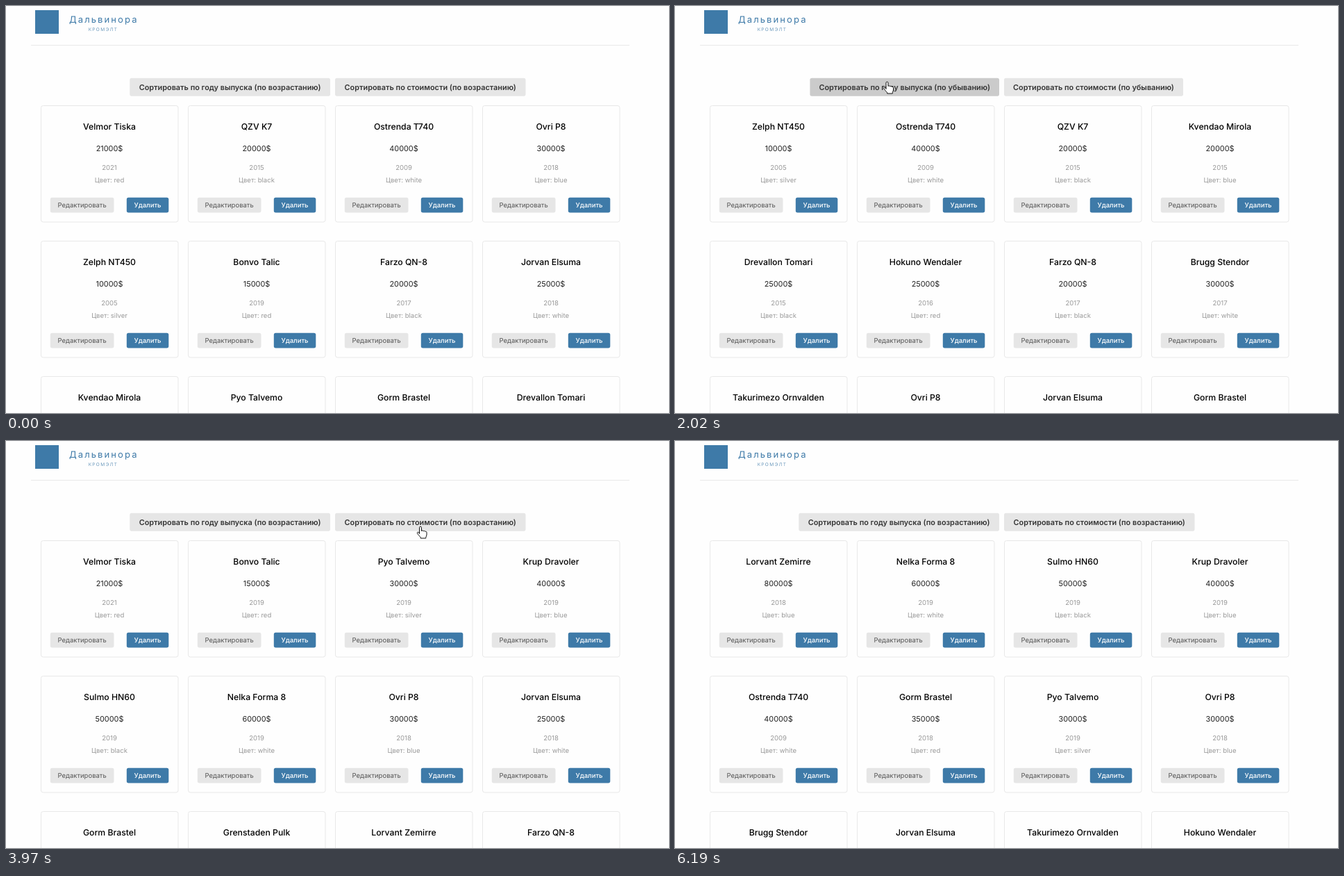
Recreate the animation shown at these times as an HTML page. Size 955 by 586 pixels, loop 6610 ms.

```html
<!DOCTYPE html>
<html lang="ru">
<head>
<meta charset="utf-8">
<title>Каталог машин</title>
<style>
  html, body { margin: 0; width: 100%; height: 100%; overflow: hidden; background: #fefefe; }
  svg { display: block; width: 955px; height: 586px; font-family: Inter, sans-serif; text-rendering: geometricPrecision; }
  .name { font-size: 12.24px; font-weight: 500; fill: #000; }
  .price { font-size: 10.88px; fill: #222; }
  .note { font-size: 9.52px; fill: #999; }
  .edit { font-size: 9.52px; fill: #555; }
  .del { font-size: 9.52px; font-weight: 500; fill: #fff; }
  .sort { font-size: 10.88px; font-weight: 600; fill: #333; }
  .brand { font-size: 13px; font-weight: 400; letter-spacing: 2.1px; fill: #3e7aa8; }
  .sub { font-size: 6.5px; font-weight: 300; letter-spacing: 1.4px; fill: #3e7aa8; }
</style>
</head>
<body>
<svg id="stage" viewBox="0 0 955 586"></svg>
<script>
const LOOP = 6610, STEP = 70;
const BLUE = '#3e7aa8', GREY = '#e6e6e6', HOVER = '#cbcbcb';

const cars = [
  ['Velmor Tiska', 21000, 2021, 'red'],
  ['QZV K7', 20000, 2015, 'black'],
  ['Ostrenda T740', 40000, 2009, 'white'],
  ['Ovri P8', 30000, 2018, 'blue'],
  ['Zelph NT450', 10000, 2005, 'silver'],
  ['Bonvo Talic', 15000, 2019, 'red'],
  ['Farzo QN-8', 20000, 2017, 'black'],
  ['Jorvan Elsuma', 25000, 2018, 'white'],
  ['Kvendao Mirola', 20000, 2015, 'blue'],
  ['Pyo Talvemo', 30000, 2019, 'silver'],
  ['Gorm Brastel', 35000, 2018, 'red'],
  ['Drevallon Tomari', 25000, 2015, 'black'],
  ['Krup Dravoler', 40000, 2019, 'blue'],
  ['Grenstaden Pulk', 20000, 2018, 'silver'],
  ['Hokuno Wendaler', 25000, 2016, 'red'],
  ['Sulmo HN60', 50000, 2019, 'black'],
  ['Brugg Stendor', 30000, 2017, 'white'],
  ['Takurimezo Ornvalden', 25000, 2017, 'black'],
  ['Lorvant Zemirre', 80000, 2018, 'blue'],
  ['Nelka Forma 8', 60000, 2019, 'white']
].map(([name, price, year, color]) => ({ name, price, year, color }));

// Each sort works on the previous order, so ties keep their sequence.
const by = (list, key, sign) => [...list].sort((a, b) => sign * (a[key] - b[key]));
const views = [{ from: 0, list: cars, rising: true }];
for (const [from, key, sign] of [[2020, 'year', 1], [3360, 'year', -1], [4380, 'price', 1], [5780, 'price', -1]]) {
  views.push({ from, list: by(views[views.length - 1].list, key, sign), rising: sign < 0 });
}
const clicks = [[1890, 2020], [3290, 3360], [4320, 4380], [5710, 5780]];

// Pointer tracks: time, x, y
const tracks = [
  [[430, 894, 560], [570, 820, 470], [780, 560, 270], [920, 420, 180], [1060, 347, 127],
   [1200, 322, 113], [1550, 309.5, 107.5], [1690, 305.5, 109.5]],
  [[3620, 312, 111], [3690, 352, 118], [3760, 420, 128], [3830, 510, 135], [3900, 605, 137],
   [3970, 597, 123.5], [4040, 592, 120], [4250, 589, 116.5]],
  [[5780, 589, 116.5], [5850, 596, 124], [5920, 650, 200], [5990, 725, 320], [6060, 795, 450], [6120, 838, 550]]
];

const stage = document.getElementById('stage');
function add(tag, attrs, text = '') {
  const el = document.createElementNS('http://www.w3.org/2000/svg', tag);
  for (const k in attrs) el.setAttribute(k, attrs[k]);
  el.textContent = text;
  stage.append(el);
  return el;
}
const box = (x, y, width, height, fill, rx = 2.7) => add('rect', { x, y, width, height, fill, rx });
const label = (cls, x, y, text) => add('text', { class: cls, x, y, 'text-anchor': 'middle' }, text);

// Header
box(42, 6, 34, 34, BLUE, 0);
add('text', { class: 'brand', x: 91, y: 24 }, 'Дальвинора');
label('sub', 140, 35.7, 'КРОМЭЛТ');
box(36, 56, 862, 1, '#e9e9e9', 0);

const sorts = ['году выпуска', 'стоимости'].map(what => ({
  what, rect: box(0, 103.7, 0, 26, GREY), text: label('sort', 0, 120.8)
}));

// Card grid
const COL = 212, ROW = 195;
const EDIT = [13.8, 132.7, 91.7, 21.8], DEL = [123.8, 132.7, 60.5, 21.8];
const cells = Array.from({ length: 12 }, (_, i) => {
  const x = 50 + i % 4 * COL, y = 143 + Math.floor(i / 4) * ROW, mid = x + 99;
  const button = ([dx, dy, w, h], fill, cls, text) => {
    box(x + dx, y + dy, w, h, fill);
    label(cls, x + dx + w / 2, y + dy + 14.4, text);
  };
  add('rect', { x: x + .5, y: y + .5, width: 197.5, height: 167.5, rx: 3, fill: '#fefefe', stroke: '#e8e8e8' });
  const cell = {
    name: label('name', mid, y + 35.4),
    price: label('price', mid, y + 65.9),
    year: label('note', mid, y + 93.3),
    color: label('note', mid, y + 111)
  };
  button(EDIT, GREY, 'edit', 'Редактировать');
  button(DEL, BLUE, 'del', 'Удалить');
  return cell;
});

const skin = d => add('path', { d, fill: '#fff', stroke: '#111', 'stroke-width': 1, 'stroke-linejoin': 'round' });
const arrow = skin('M0 0V16.5L3.8 13 6.3 18.8 8.8 17.7 6.3 12H11.5Z');
const hand = skin('M-1.5 10V1.2a1.5 1.5 0 0 1 3 0V6c.6-.9 2.4-.8 2.8.3 .7-.7 2.2-.5 2.5.6 ' +
  '1-.5 2.2.1 2.2 1.3V11.5c0 1.5-1 2.5-1.2 3.6V16.5H.2V15.3C-1 13.5-4 11-4.6 9.2c-.5-1.4 1.2-2.1 2-1.2z');
const glow = add('circle', { r: 8.5, fill: '#e8e224', 'fill-opacity': .72 });

function pointer(t) {
  if (t < 430 || t >= 6190) return null;
  const track = tracks.filter(p => p[0][0] <= t).pop();
  const start = track[0][0];
  const q = start + Math.floor((t - start) / STEP) * STEP;
  const next = track.findIndex(p => p[0] > q);
  if (next < 0) return track[track.length - 1].slice(1);
  const [t0, x0, y0] = track[next - 1], [t1, x1, y1] = track[next];
  const k = (q - t0) / (t1 - t0);
  return [x0 + (x1 - x0) * k, y0 + (y1 - y0) * k];
}

const inside = (p, x, y, w, h) => p && p[0] >= x && p[0] <= x + w && p[1] >= y && p[1] <= y + h;

function sortBounds(i, rising) {
  return i ? [474, rising ? 274.5 : 258] : rising ? [178.3, 288.7] : [194.4, 272.6];
}

function overCardButton(p) {
  const local = [(p[0] - 50) % COL, (p[1] - 143) % ROW];
  return inside(local, ...EDIT) || inside(local, ...DEL);
}

let shown = null;
function showView(view) {
  if (view === shown) return;
  shown = view;
  cells.forEach((cell, i) => {
    const car = view.list[i];
    cell.name.textContent = car.name;
    cell.price.textContent = car.price + '$';
    cell.year.textContent = car.year;
    cell.color.textContent = 'Цвет: ' + car.color;
  });
  sorts.forEach((s, i) => {
    const [x, w] = sortBounds(i, view.rising);
    s.rect.setAttribute('x', x);
    s.rect.setAttribute('width', w);
    s.text.setAttribute('x', x + w / 2);
    s.text.textContent = `Сортировать по ${s.what} (по ${view.rising ? 'возрастанию' : 'убыванию'})`;
  });
}

const show = (el, on) => el.setAttribute('visibility', on ? 'visible' : 'hidden');

function draw(t) {
  const view = views.filter(v => v.from <= t).pop();
  showView(view);

  const p = pointer(t), late = pointer(t - STEP);
  const over = (q, i) => {
    const [x, w] = sortBounds(i, view.rising);
    return inside(q, x, 104, w, 25.5);
  };
  sorts.forEach((s, i) => s.rect.setAttribute('fill', p && over(late, i) ? HOVER : GREY));

  const pointing = p && (over(p, 0) || over(p, 1) || overCardButton(p));
  show(hand, pointing);
  show(arrow, p && !pointing);
  show(glow, clicks.some(([a, b]) => t >= a && t < b));
  if (p) {
    const [x, y] = p;
    for (const el of [hand, arrow]) el.setAttribute('transform', `translate(${x} ${y})`);
    glow.setAttribute('transform', `translate(${x - 1} ${y + 1.5})`);
  }
}

const begin = performance.now();
function tick() {
  draw((performance.now() - begin) % LOOP);
  requestAnimationFrame(tick);
}
tick();
</script>
</body>
</html>
```
